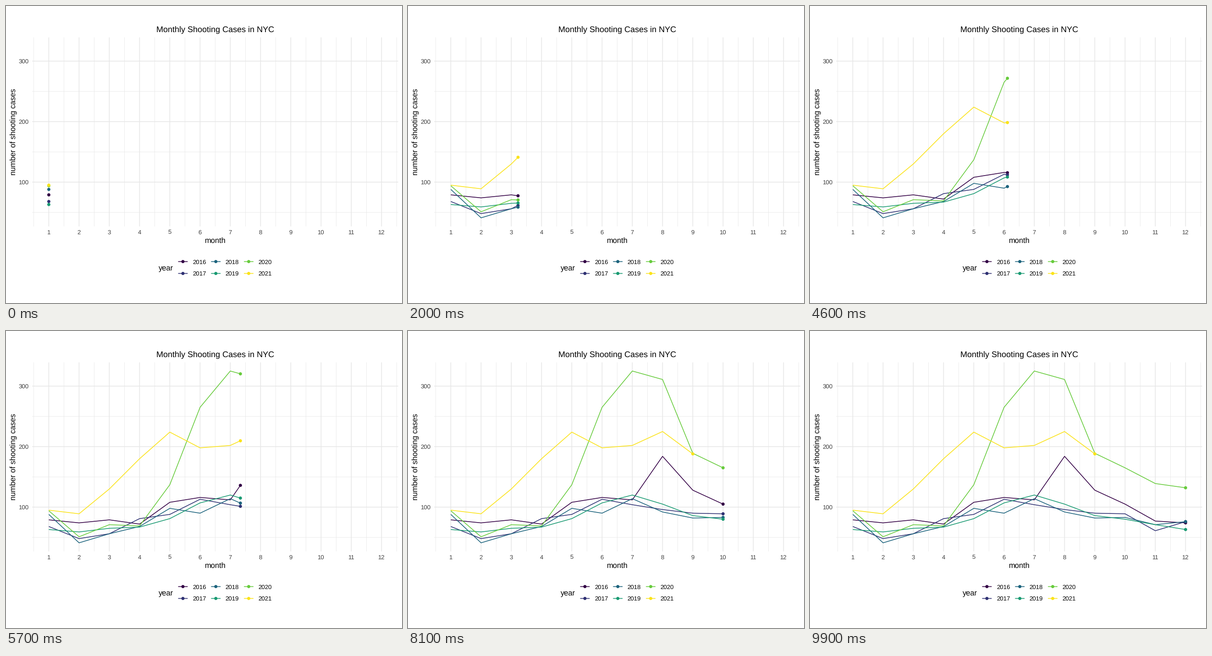
Write a matplotlib script that moves like this. It is 864 px wide and 648 px high and loops after 10000 ms.

```python
import numpy as np
import matplotlib.pyplot as plt
from matplotlib.animation import FuncAnimation
from matplotlib.patches import Circle

W, H, DPI = 864, 648, 108
FRAMES, INTERVAL = 100, 100
LEFT, RIGHT, TOP, BOTTOM = 57.1, 855.7, 68.5, 480.9
DOT_R = 3.46
LINE_W = 1.067

CASES = {
    2016: [79, 74, 79, 72, 108, 116, 112, 184, 128, 105, 77, 74],
    2017: [68, 48, 56, 81, 88, 113, 104, 96, 90, 89, 61, 76],
    2018: [88, 41, 56, 68, 98, 90, 114, 92, 82, 83, 71, 76],
    2019: [63, 59, 65, 67, 81, 107, 120, 105, 86, 80, 71, 63],
    2020: [94, 51, 71, 69, 137, 265, 325, 311, 189, 165, 139, 132],
    2021: [95, 89, 130, 180, 224, 198, 202, 225, 188],
}
COLORS = ["#330045", "#2f3173", "#1c637d", "#199a72", "#67cb3c", "#fbe31a"]
GRID = "#e7e7e7"
TICK = "#3f3f3f"

plt.rcParams["font.family"] = "Liberation Sans"
plt.rcParams["text.hinting"] = "none"
plt.rcParams["path.simplify"] = False

fig = plt.figure(figsize=(W / DPI, H / DPI), dpi=DPI, facecolor="white")
ax = fig.add_axes([0, 0, 1, 1])
ax.set_xlim(0, W)
ax.set_ylim(H, 0)
ax.axis("off")


def px(month):
    return 93.4 + 66 * (month - 1)


def py(count):
    return 384.3 - 1.32 * (count - 100)


def stroke(xs, ys, color, width=LINE_W, z=2):
    line, = ax.plot(xs, ys, color=color, lw=width, zorder=z, snap=False,
                    solid_capstyle="butt", solid_joinstyle="round")
    return line


def dot(x, y, color):
    return ax.add_patch(Circle((x, y), DOT_R, fc=color, lw=0, zorder=4))


def label(x, y, text, size=8.8, color="black", ha="center", **kw):
    ax.text(x, y, text, fontsize=size, color=color, ha=ha,
            va="baseline", **kw)


def draw_grid():
    def vertical(month, width, z):
        stroke([px(month)] * 2, [TOP, BOTTOM], GRID, width, z)

    def horizontal(count, width, z):
        stroke([LEFT, RIGHT], [py(count)] * 2, GRID, width, z)

    for month in np.arange(0.5, 13):
        vertical(month, LINE_W / 2, 0)
    for count in (50, 150, 250):
        horizontal(count, LINE_W / 2, 0)
    for count in (100, 200, 300):
        horizontal(count, LINE_W, 1)
        label(49.7, py(count) + 4.7, str(count), color=TICK, ha="right")
    for month in range(1, 13):
        vertical(month, LINE_W, 1)
        label(px(month), 497.9, str(month), color=TICK)


def draw_titles():
    label(456.4, 56.6, "Monthly Shooting Cases in NYC", 12)
    label(456.4, 516.6, "month", 11)
    label(20.1, 274.7, "number of shooting cases", 11,
          rotation=90, rotation_mode="anchor")


def draw_legend():
    label(332.8, 576.3, "year", 11, ha="left")
    for i, (year, color) in enumerate(zip(CASES, COLORS)):
        col, row = divmod(i, 2)
        x, y = 386 + 71.78 * col, 557.6 + 25.92 * row
        stroke([x - 10.4, x + 10.4], [y, y], color)
        dot(x, y, color)
        label(x + 20.9, y + 4.8, str(year), ha="left")


draw_grid()
draw_titles()
draw_legend()
series = [(np.array(counts), stroke([], [], c, z=3), dot(px(1), py(counts[0]), c))
          for counts, c in zip(CASES.values(), COLORS)]


def update(k):
    now = 1 + k / 9
    for counts, line, head in series:
        end = min(now, len(counts))
        months = np.append(np.arange(1, end), end)
        values = np.interp(months, np.arange(1, len(counts) + 1), counts)
        xs, ys = px(months), py(values)
        line.set_data(xs, ys)
        head.center = xs[-1], ys[-1]
    return [artist for _, *pair in series for artist in pair]


anim = FuncAnimation(fig, update, frames=FRAMES, interval=INTERVAL,
                     repeat=True, repeat_delay=0, blit=False)
plt.show()
```
